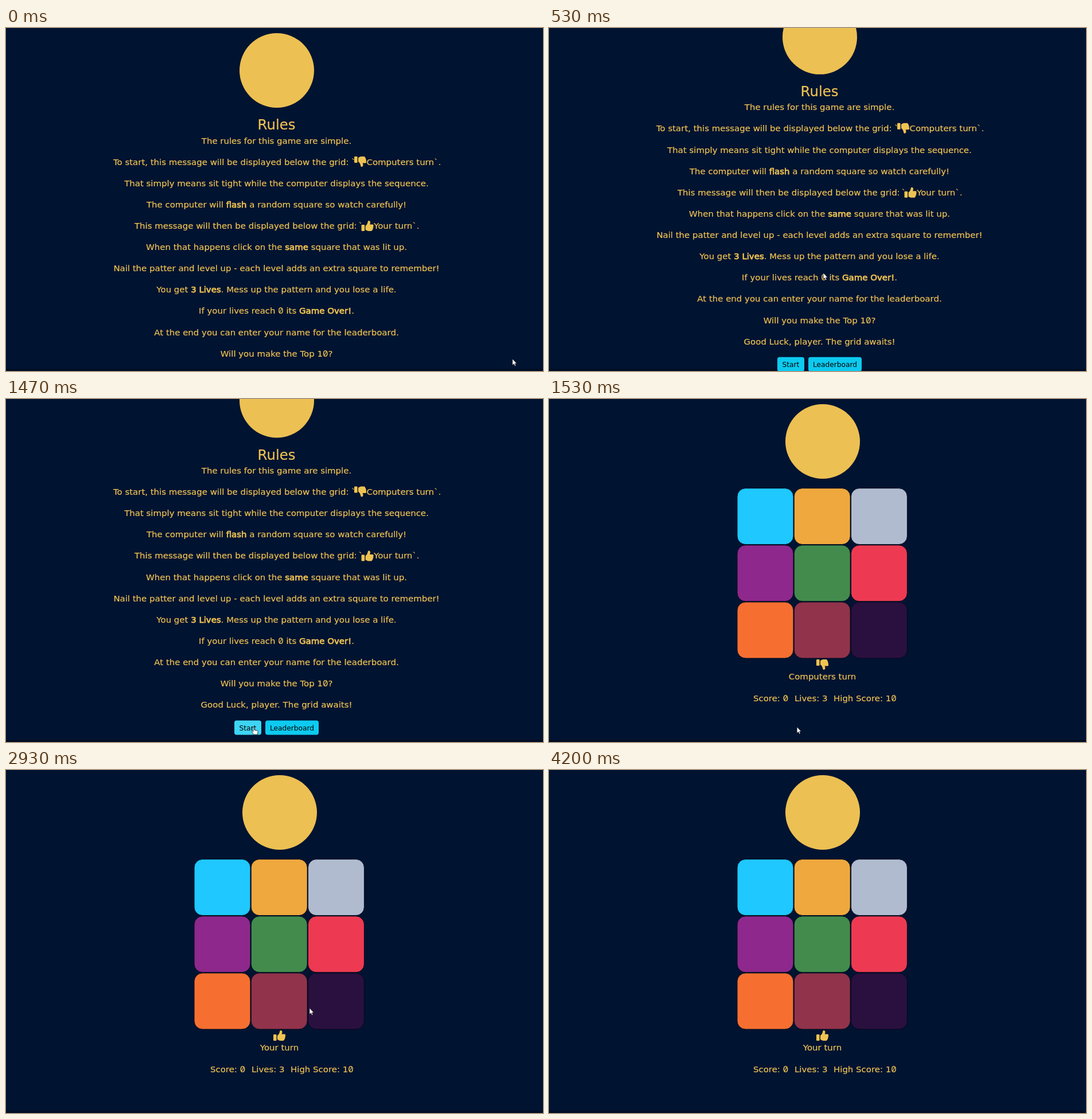
Animation, 936 px wide and 598 px high, one loop 4670 ms. Source, as an HTML page:

```html
<!DOCTYPE html>
<html lang="en">
<head>
<meta charset="utf-8">
<title>Memory game</title>
<style>
html, body { margin: 0; width: 100%; height: 100%; overflow: hidden; background: #001331; }
svg { display: block; width: 936px; height: 598px; }
text { font: 14.95px "DejaVu Sans", sans-serif; fill: #efc352; stroke: #efc352; stroke-width: .2px; white-space: pre; }
.mid { text-anchor: middle; }
.title { font-size: 24.4px; }
.b { stroke-width: .75px; }
.z { font-family: Inter, sans-serif; font-feature-settings: "zero"; }
.btn { font-size: 12.2px; fill: #000; stroke: none; text-anchor: middle; }
.icon { fill: #efc352; }
</style>
</head>
<body>
<svg viewBox="0 0 936 598">
  <defs>
    <g id="thumb">
      <rect y="7" width="5.6" height="11" rx="1.3"/>
      <path d="M7 9C9 7.4 10.6 5.4 11 2.4C11.3 .6 12 0 13.1 0C15.8 .2 16 3.2 14.6 6.5H19C21.4 6.5 21.8 9 20.4 10C21.4 11 21 12.6 20 13C20.5 14.4 20 15.6 19 15.8C19 17.4 18 18 16.5 18H12.5C10 18 8.5 16.5 7 15.8Z"/>
    </g>
  </defs>
  <rect width="936" height="598" fill="#001331"/>
  <rect y="594.5" width="936" height="3.5" fill="#000" opacity=".3"/>
  <g id="rules"></g>
  <g id="game"></g>
  <g id="cursor">
    <path id="arrow" d="M0 0V11L2.6 8.7L4.2 12.5L6 11.7L4.4 8H7.6Z" fill="#fff" stroke="#000" stroke-width=".6"/>
    <path id="beam" d="M-3 -5.5H-.8L0 -5L.8 -5.5H3M0 -5V5M-3 5.5H-.8L0 5L.8 5.5H3" fill="none" stroke="#a9adb8" stroke-width="1"/>
    <path id="hand" d="M-1 .8C-1 -.5 1 -.5 1 .8V5L6 6C7 6.3 7.4 7 7.2 8L6.4 13H0L-3.6 8.2C-4 7 -2.6 6.6 -1 8Z" fill="#fff" stroke="#000" stroke-width=".7"/>
  </g>
</svg>
<script>
const LOOP = 4670, STEP = 200 / 3, MID = 471.5;
const $ = id => document.getElementById(id);

// *word* is strong; zeros are slashed
const rich = s => s
  .replace(/0/g, '<tspan class="z">0</tspan>')
  .replace(/\*(.+?)\*/g, '<tspan class="b">$1</tspan>');
const text = (x, cy, s, cls = '', rise = 5.5) =>
  `<text x="${x}" y="${cy + rise}" class="${cls}">${rich(s)}</text>`;
const thumb = (x, cy, up) =>
  `<use href="#thumb" class="icon" transform="translate(${x} ${cy + (up ? -9 : 9)}) scale(1 ${up ? 1 : -1})"/>`;
const logo = x => `<circle cx="${x}" cy="74" r="65" fill="#ecc052"/>`;
const button = (x, w, s, id) =>
  `<rect id="${id}" x="${x}" y="632" width="${w}" height="25" rx="4" fill="#0dcaf0"/>` +
  text(x + w / 2, 644.5, s, 'btn', 4.5);

const lines = [
  'The rules for this game are simple.',
  [[187, 'To start, this message will be displayed below the grid:'], [602, '`'], [628.5, 'Computers turn`.']],
  'That simply means sit tight while the computer displays the sequence.',
  'The computer will *flash* a random square so watch carefully!',
  [[224, 'This message will then be displayed below the grid:'], [614.5, '`'], [641, 'Your turn`.']],
  'When that happens click on the *same* square that was lit up.',
  'Nail the patter and level up - each level adds an extra square to remember!',
  'You get *3 Lives*. Mess up the pattern and you lose a life.',
  'If your lives reach 0 its *Game Over!*.',
  'At the end you can enter your name for the leaderboard.',
  'Will you make the Top 10?',
  'Good Luck, player. The grid awaits!'
];
const lineY = i => 196 + 37.12 * i;

$('rules').innerHTML = logo(472) + text(MID, 168, 'Rules', 'mid title', 9) +
  lines.map((l, i) => typeof l === 'string'
    ? text(MID, lineY(i), l, 'mid')
    : l.map(([x, s]) => text(x, lineY(i), s)).join('')).join('') +
  thumb(607, 233, false) + thumb(619.5, 345, true) +
  button(398, 47, 'Start', 'start') + button(452, 93, 'Leaderboard', 'board');

const colors = ['#1fc8ff', '#efa83d', '#b1bbd0', '#8e288c', '#438b4d',
  '#ed3a52', '#f66f31', '#91334b', '#2a103f'];
$('game').innerHTML = logo(477) +
  colors.map((c, i) => `<rect id="cell${i}" x="${328 + 99.2 * (i % 3)}" y="${155.6 + 99.2 * Math.floor(i / 3)}"
    width="98" height="98" rx="14.5" fill="${c}" stroke="#000a1c" stroke-width="1"/>`).join('') +
  ['wait', 'go'].map((id, up) => `<g id="${id}">${thumb(466, 463, up)}` +
    text(476.5, 483, up ? 'Your turn' : 'Computers turn', 'mid') + '</g>').join('') +
  text(356, 521, 'Score: 0') + text(428, 521, 'Lives: 3') + text(496, 521, 'High Score: 10');

// keys: time, then values
const scrollKeys = [[333, 0], [400, 6], [467, 30], [533, 58], [600, 69], [667, 71.5]];
const cursorKeys = [
  [0, 883, 577], [67, 850, 565], [200, 560, 457], [267, 479, 427], [533, 478, 427],
  [667, 476, 436], [933, 444, 555], [1067, 438, 563], [1333, 432, 572], [1533, 432, 572],
  [1933, 504, 409], [2000, 529, 415], [3667, 529, 415], [3800, 480, 432], [4133, 52, 590]
];

function at(keys, t) {
  const n = keys.findIndex(k => k[0] > t);
  if (n === 0) return keys[0].slice(1);
  if (n < 0) return keys[keys.length - 1].slice(1);
  const a = keys[n - 1], b = keys[n], k = (t - a[0]) / (b[0] - a[0]);
  return a.slice(1).map((v, i) => v + (b[i + 1] - v) * k);
}
const show = (id, on) => $(id).setAttribute('display', on ? 'inline' : 'none');
const scrollAt = t => at(scrollKeys, t)[0];

// the pointer shape reacts to the page a little late
function pointer(x, y, t) {
  if (t > 1500) return 'arrow';
  const py = y + scrollAt(t - 130);
  if (x > 398 && x < 445 && py > 632 && py < 657) return 'hand';
  const i = Math.round((py - lineY(0)) / 37.12);
  const onLine = i >= 0 && i < lines.length && Math.abs(py - lineY(i)) < 11;
  return onLine && Math.abs(x - MID) < 285 ? 'beam' : 'arrow';
}

// hover fade from the normal to the lighter blue
function startFill(t) {
  const k = Math.min(1, Math.max(0, (t - 1067) / 200));
  const mix = (a, b) => Math.round(a + (b - a) * k);
  return `rgb(${mix(13, 49)},${mix(202, 210)},${mix(240, 242)})`;
}

function draw(time) {
  // the picture advances 15 times a second
  const t = Math.floor((time % LOOP + 5) / STEP) * STEP + .5;
  const playing = t > 1500;
  show('rules', !playing);
  show('game', playing);
  $('rules').setAttribute('transform', `translate(0 ${-scrollAt(t)})`);
  $('start').setAttribute('fill', t > 1460 ? '#3dd5f3' : startFill(t));

  $('cell2').setAttribute('fill', t > 2330 && t < 2730 ? '#fff' : colors[2]);
  show('wait', t < 2930);
  show('go', t > 2930);

  const [x, y] = at(cursorKeys, t);
  const shape = pointer(x, y, t);
  $('cursor').setAttribute('transform', `translate(${x} ${y})`);
  show('cursor', t < 4190);
  for (const id of ['arrow', 'beam', 'hand']) show(id, id === shape);
}

const begin = performance.now();
function tick() {
  draw(performance.now() - begin);
  requestAnimationFrame(tick);
}
tick();
</script>
</body>
</html>
```
